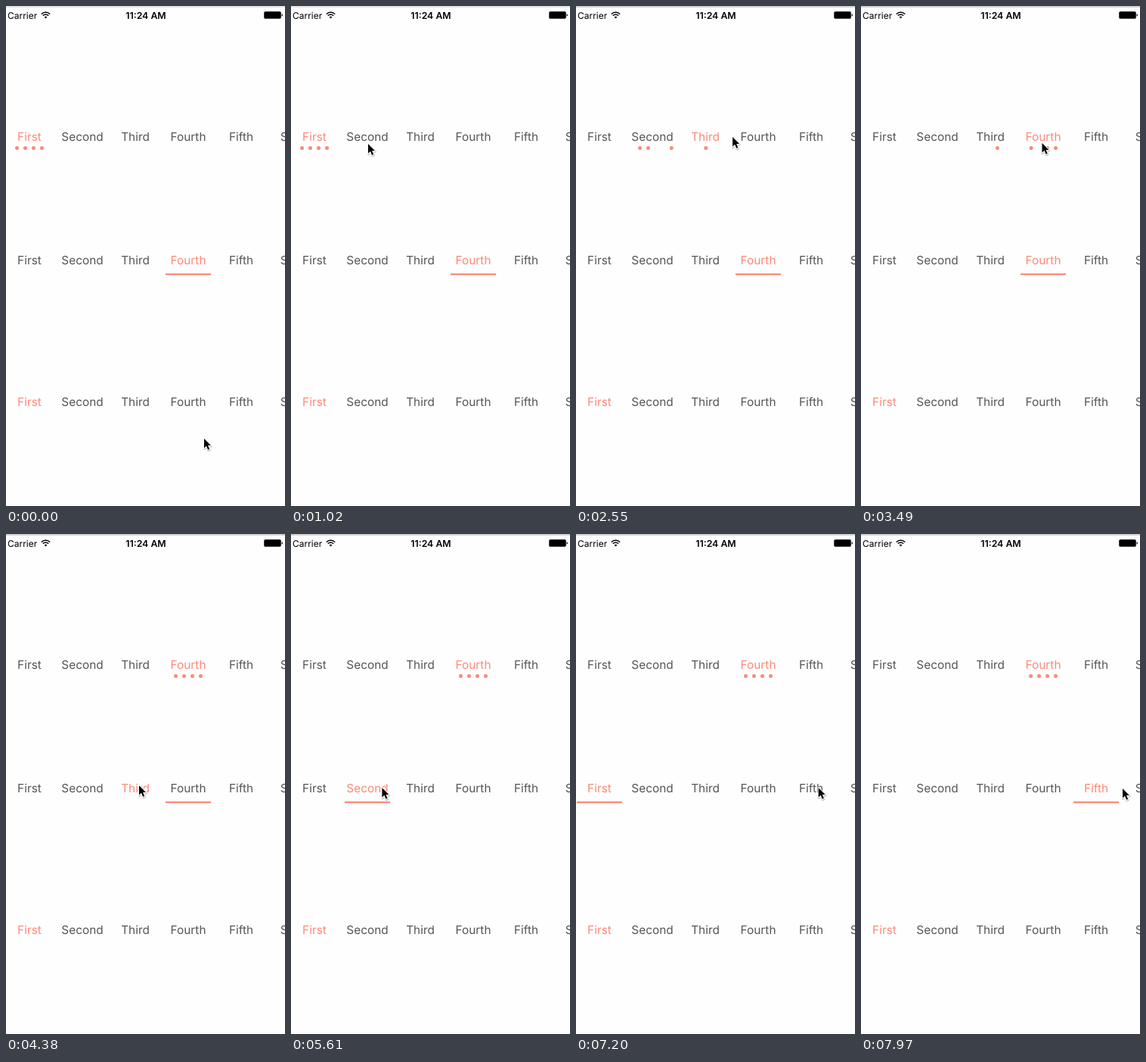
Animation of 369 by 660 pixels, one loop 8 s. Source, as an HTML page:

```html
<!DOCTYPE html>
<html lang="en">
<head>
<meta charset="utf-8">
<title>Tab indicators</title>
<style>
  html, body { margin: 0; width: 100%; height: 100%; overflow: hidden; background: #fefefe; }
  svg { display: block; width: 369px; height: 660px; }
  text { font-family: Inter, Roboto, sans-serif; font-size: 12px; text-rendering: geometricPrecision; }
  .clock { font-size: 12.3px; font-weight: 600; text-anchor: middle; }
  .tab { font-size: 15.4px; fill: #555; text-anchor: middle; }
  .tab.on, .mark { fill: #ff8878; }
</style>
</head>
<body>
<svg viewBox="0 0 369 660">
  <rect id="edge" y="0.5" width="369" height="1"/>
  <text x="2" y="16.7">Carrier</text>
  <path d="M50.6 14.6a2.7 2.7 0 0 1 3.8 0l-1.9 2z"/>
  <path d="M46.8 10.7a8.1 8.1 0 0 1 11.4 0M48.8 12.8a5.2 5.2 0 0 1 7.4 0" fill="none" stroke="#000" stroke-width="1.5"/>
  <text class="clock" x="185" y="16.7">11:24 AM</text>
  <rect x="341.5" y="7.5" width="22" height="9" rx="1.5" stroke="#000" stroke-opacity=".5"/>
  <path d="M364.6 10.4q1.4.3 1.4 1.7t-1.4 1.7z"/>
  <g id="rows"></g>
  <g id="cursor">
    <path d="M0 0V12.6L3 9.8 5.1 14.8 7.2 13.9 5.1 9H9Z" transform="translate(.4 1)" fill="none" stroke="#000" stroke-opacity=".2" stroke-width="3" stroke-linejoin="round"/>
    <path d="M0 0V12.6L3 9.8 5.1 14.8 7.2 13.9 5.1 9H9Z" stroke="#fff" stroke-width="2" stroke-linejoin="round" paint-order="stroke"/>
  </g>
</svg>
<script>
const LOOP = 8000, LINE_TIME = 300, DOT_TIME = 160, DOT_DELAY = 55;
const names = ['First', 'Second', 'Third', 'Fourth', 'Fifth', 'Sixth'];
const byId = id => document.getElementById(id);
const centre = tab => 31 + 70 * tab;

const dotTabs = { first: 0, taps: [
  { at: 1490, tab: 1 }, { at: 2440, tab: 2 }, { at: 3260, tab: 3 }
] };
const lineTabs = { first: 3, taps: [
  { at: 4380, tab: 2 }, { at: 5200, tab: 1 }, { at: 6090, tab: 0 }, { at: 7490, tab: 4 }
] };

const home = { x: 262, y: 571 };
const moves = [
  { from: 200, to: 1020, x: 102, y: 182 },
  { from: 1760, to: 2140, x: 187, y: 173 },
  { from: 2430, to: 2900, x: 247, y: 173 },
  { from: 3380, to: 4200, x: 176, y: 332 },
  { from: 4400, to: 4900, x: 121, y: 335 },
  { from: 5600, to: 5970, x: 22, y: 335 },
  { from: 6240, to: 7320, x: 316, y: 335 },
  { from: 7580, to: 7960, x: 346, y: 336 }
];

function ease(p) {
  p = Math.min(1, Math.max(0, p));
  return p * p * (3 - 2 * p);
}

// Runs slightly past the goal before settling, like a hand on a mouse
const reach = p => ease(1.3 * p) + 0.15 * Math.sin(Math.PI * ease(p));

function pointer(t) {
  let { x, y } = home;
  for (const move of moves) {
    const p = (t - move.from) / (move.to - move.from);
    x += (move.x - x) * reach(p);
    y += (move.y - y) * ease(p);
  }
  return { x, y };
}

function glide({ first, taps }, t, duration) {
  return taps.reduce((x, { at, tab }) =>
    x + (centre(tab) - x) * ease((t - at) / duration), centre(first));
}

function selected({ first, taps }, t) {
  return taps.reduce((current, { at, tab }) => t >= at ? tab : current, first);
}

function add(tag, attrs, text = '') {
  const el = document.createElementNS('http://www.w3.org/2000/svg', tag);
  for (const key in attrs) el.setAttribute(key, attrs[key]);
  el.textContent = text;
  return byId('rows').appendChild(el);
}

const addRow = y => names.map((name, i) => add('text', { class: 'tab', x: centre(i), y }, name));
const highlight = (row, tab) => row.forEach((el, i) => el.classList.toggle('on', i === tab));

const dotRow = addRow(177.6), lineRow = addRow(341.2), stillRow = addRow(527.7);
const dots = [0, 1, 2, 3].map(() => add('circle', { class: 'mark', cy: 187.4, r: 2.5 }));
const line = add('rect', { class: 'mark', y: 353, width: 60, height: 2.2 });
highlight(stillRow, 0);

function draw(t) {
  byId('edge').setAttribute('fill', t < dotTabs.taps[0].at ? '#cbcbcb' : '#a4a4a4');
  highlight(dotRow, selected(dotTabs, t));
  highlight(lineRow, selected(lineTabs, t));
  dots.forEach((dot, i) => {
    const x = glide(dotTabs, t - (3 - i) * DOT_DELAY, DOT_TIME);
    dot.setAttribute('cx', x + (i - 1.5) * 11);
  });
  line.setAttribute('x', glide(lineTabs, t, LINE_TIME) - 30);
  const { x, y } = pointer(t);
  byId('cursor').setAttribute('transform', `translate(${x} ${y})`);
}

const start = performance.now();
function tick() {
  draw((performance.now() - start) % LOOP);
  requestAnimationFrame(tick);
}
tick();
</script>
</body>
</html>
```
